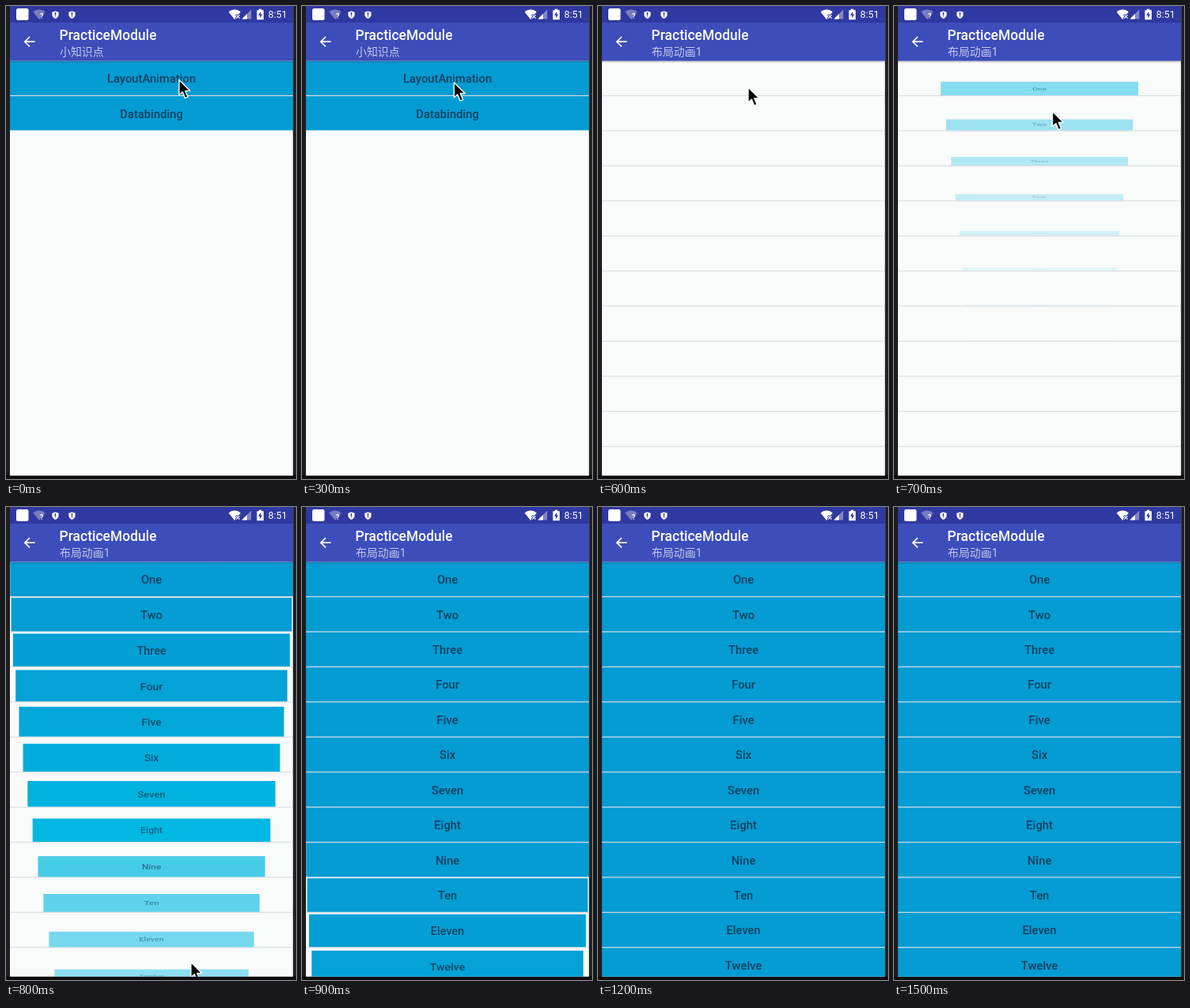
Recreate the animation shown at these times as an HTML page. Size 367 by 599 pixels, loop 1600 ms.

```html
<!DOCTYPE html>
<html lang="zh-CN">
<head>
<meta charset="utf-8">
<title>List animation</title>
<style>
  html, body { margin: 0; width: 100%; height: 100%; overflow: hidden; background: #1d1e20; }
  svg { display: block; width: 367px; height: 599px; }
  text { font-family: Roboto, "Noto Sans CJK SC", "Noto Sans CJK", sans-serif; }
  .label { font-size: 14.8px; font-weight: 500; text-anchor: middle; fill: #0b4160; }
  .title { font-size: 17.45px; font-weight: 500; fill: #fff; }
  .sub { font-size: 13.95px; fill: #fff; fill-opacity: .7; }
  .clock { font-size: 12.4px; fill: #fff; }
</style>
</head>
<body>
<svg viewBox="0 0 367 599">
  <defs>
    <clipPath id="screen"><rect x="5" y="0" width="358.2" height="594.7"/></clipPath>
    <clipPath id="firstRow"><rect x="5" y="69.7" width="358.2" height="43.3"/></clipPath>
    <linearGradient id="shade" x2="0" y2="1">
      <stop offset="0" stop-color="#000" stop-opacity=".26"/>
      <stop offset="1" stop-color="#000" stop-opacity="0"/>
    </linearGradient>
    <path id="shield" d="M0-4.6 4.1-3.2V0C4.1 2.4 2.2 4.1 0 5-2.2 4.1-4.1 2.4-4.1 0V-3.2Z"/>
    <path id="fan" d="M0 13 -7.6 3.4C-3.6-.6 3.6-.6 7.6 3.4Z"/>
  </defs>
  <rect width="367" height="599" fill="#1d1e20"/>
  <rect y="594" width="367" height="5" fill="#0d0d0e"/>
  <g clip-path="url(#screen)">
    <rect x="5" width="359" height="595" fill="#f9fafa"/>
    <g id="lines"></g>
    <g id="rows"></g>
    <circle id="ripple" cx="186.5" cy="91.5" fill="#003c58" fill-opacity=".09" clip-path="url(#firstRow)"/>
    <rect x="5" y="69.3" width="359" height="3" fill="url(#shade)"/>
    <rect x="5" y="21" width="359" height="48.5" fill="#3d4dba"/>
    <rect x="5" width="359" height="21" fill="#3039a1"/>

    <rect x="13" y="3" width="15.5" height="15" rx="2.5" fill="#fff"/>
    <use href="#fan" x="42" y="4" fill="#fff" fill-opacity=".35"/>
    <text x="43" y="16" font-size="9" font-weight="700" fill="#fff">?</text>
    <g fill="#fff">
      <use href="#shield" x="62.5" y="11"/>
      <use href="#shield" x="83.5" y="11"/>
      <use href="#fan" x="289.3" y="4"/>
      <path d="M310.3 4.5V16.5H298.5Z" fill-opacity=".4"/>
      <path d="M305 10V16.5H298.5Z"/>
      <path d="M317.5 5.3H320V3.8H323.4V5.3H326V17.3H317.5Z"/>
    </g>
    <g fill="none" stroke="#3039a1">
      <path d="M62.5 8V11.7M83.5 8V11.7M62.5 12.6V13.6M83.5 12.6V13.6" stroke-width="1.5"/>
      <path d="M291 11 296 16M296 11 291 16" stroke-width="3"/>
      <path d="M291.4 11.4 295.6 15.6M295.6 11.4 291.4 15.6" stroke="#fff" stroke-width="1.2"/>
    </g>
    <path d="M322.4 6.8 319.2 11.8H321.3V15.6L324.4 10.6H322.4Z" fill="#3039a1"/>
    <text class="clock" x="331.8" y="15.3">8:51</text>

    <path d="M36.5 45.2H24M30 39 23.8 45.2 30 51.4" fill="none" stroke="#fff" stroke-width="1.7"/>
    <text class="title" x="67.6" y="42.7">PracticeModule</text>
    <text class="sub" id="sub" x="68" y="62.6"></text>

    <path id="cursor" d="M0 0V19.2L4.4 15.2 7.7 23.2 11.2 21.7 7.9 13.9H14Z"
      fill="#000" stroke="#fff" stroke-width="1.4" stroke-linejoin="round"/>
  </g>
</svg>
<script>
const NS = "http://www.w3.org/2000/svg";
const LOOP = 1600, STEP = 100, OPEN = 6;
const TOP = 69.7, PITCH = 44.42, ROW_H = 43.3, LEFT = 5, WIDTH = 358.2;
const MID = LEFT + WIDTH / 2;
const MENU = ["LayoutAnimation", "Databinding"];
const NUMBERS = "One Two Three Four Five Six Seven Eight Nine Ten Eleven Twelve".split(" ");
const STAGGER = 0.05;
const HEADS = [-0.05, 0.433, 0.967, 1.367];   // progress of the first row after opening
const AFTER = [[190, 103], [200.5, 133.5], [234, 576.5]];

const $ = id => document.getElementById(id);
const clamp = x => Math.max(0, Math.min(1, x));
const mix = (a, b, k) => a + (b - a) * k;

function add(parent, tag, attrs) {
  const el = document.createElementNS(NS, tag);
  for (const k in attrs) el.setAttribute(k, attrs[k]);
  return parent.appendChild(el);
}

const rows = NUMBERS.map((name, i) => {
  const y = TOP + PITCH * i;
  const line = add($("lines"), "rect", {
    x: LEFT, y: y + ROW_H, width: WIDTH, height: PITCH - ROW_H, fill: "#d9dcde"
  });
  const g = add($("rows"), "g", {});
  const box = add(g, "rect", { x: LEFT, y, width: WIDTH, height: ROW_H });
  const label = add(g, "text", { class: "label", x: MID, y: y + 27.5 });
  return { line, g, box, label, bottom: y + ROW_H };
});

function drawRow(row, name, p) {
  row.g.style.display = name && p > 0 ? "" : "none";
  if (!name) return;
  const sx = mix(0.5, 1, p), b = row.bottom;
  row.g.setAttribute("transform", `translate(${MID} ${b}) scale(${sx} ${p}) translate(${-MID} ${-b})`);
  const k = clamp((p - 0.65) / 0.35);
  row.box.setAttribute("fill", `rgb(${mix(0, 5, k)},${mix(187, 155, k)},${mix(226, 211, k)})`);
  row.box.setAttribute("fill-opacity", p < 0.65 ? 1.18 * p : 1);
  row.label.setAttribute("fill-opacity", p);
  if (row.label.textContent !== name) row.label.textContent = name;
}

function cursorAt(n) {
  if (n >= OPEN) return AFTER[n - OPEN];
  const k = clamp(n / 4);
  const e = k * k * (3 - 2 * k);
  return [mix(219, 187.5, e), mix(93.5, 97.5, e)];
}

function draw(ms) {
  const n = Math.floor((ms % LOOP) / STEP);
  const open = n >= OPEN;
  const names = open ? NUMBERS : MENU;
  const head = open ? HEADS[n - OPEN] ?? 2 : 2;

  rows.forEach((row, i) => {
    const t = clamp(head - STAGGER * i);
    drawRow(row, names[i], (1 - Math.cos(Math.PI * t)) / 2);
    row.line.style.display = open || i < 1 ? "" : "none";
  });

  $("sub").textContent = open ? "布局动画1" : "小知识点";
  $("ripple").setAttribute("r", n === OPEN - 1 ? 58 : 0);

  const at = cursorAt(n);
  $("cursor").style.display = at ? "" : "none";
  if (at) $("cursor").setAttribute("transform", `translate(${at})`);
}

const start = performance.now();
function tick() {
  draw(performance.now() - start);
  requestAnimationFrame(tick);
}
tick();
</script>
</body>
</html>
```
